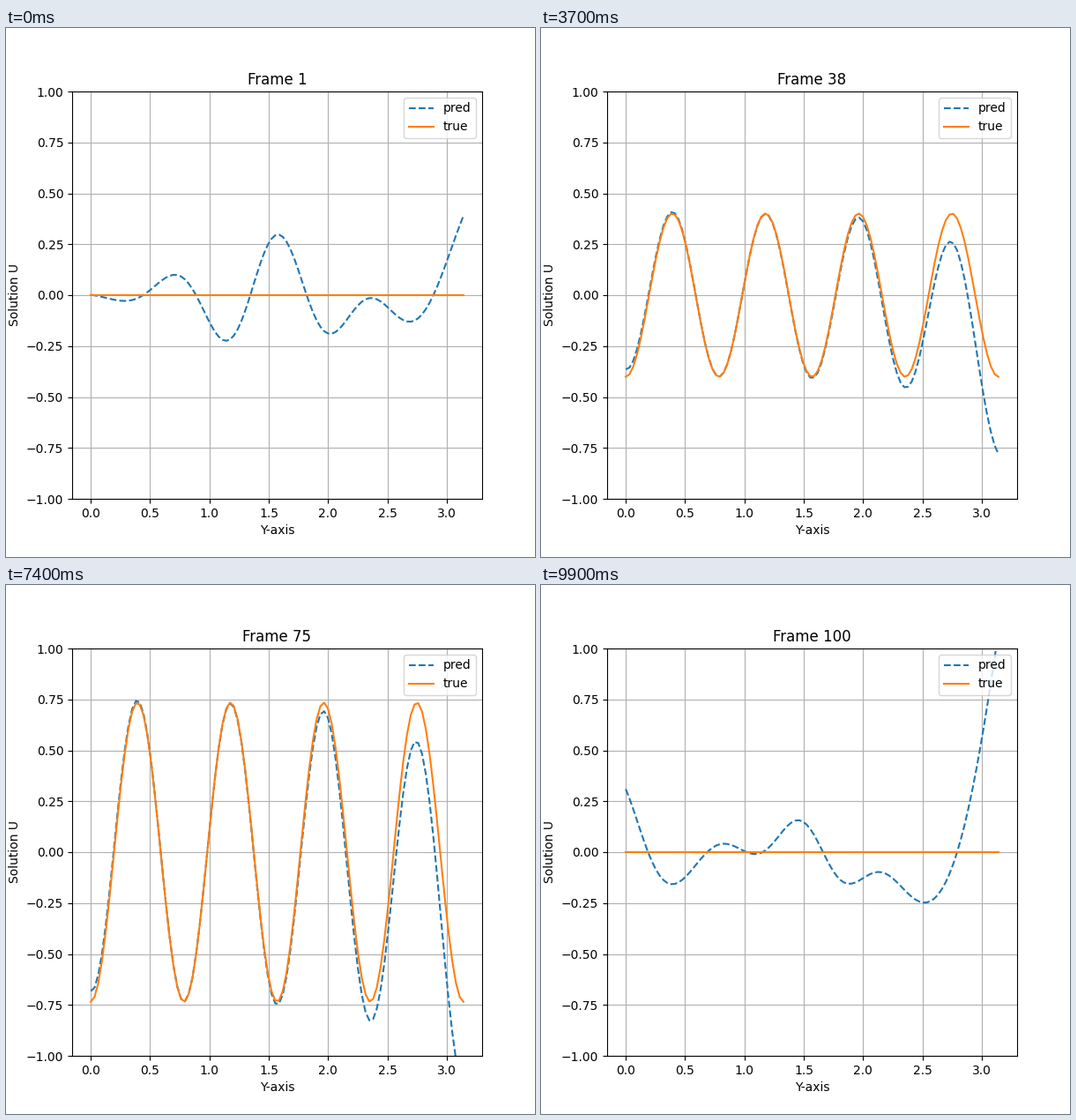
These frames come from a looping animation (600 px wide and 600 px high, 10 s). A matplotlib script:

```python
import numpy as np
import matplotlib.pyplot as plt
from matplotlib.animation import FuncAnimation

N = 100
x = np.linspace(0, np.pi, N)[:, None]
y = np.linspace(0, np.pi, N)
s = np.pi - y  # distance from the far edge


def bell(t, center, width):
    return np.exp(-((t - center) / width) ** 2)


def ripple(t, size, freq, phase, decay):
    """Damped wave running in from an edge."""
    return size * np.cos(freq * t + phase) * np.exp(-decay * t)


def packet(size, peak, center, width):
    return size * np.cos(7 * (y - peak)) * bell(y, center, width)


# Prediction error at the first and last step, and in between
start = packet(0.27, 1.57, 1.57, 0.9) + ripple(s, 0.427, 4.1, 0.42, 1.64)
end = (packet(0.17, 1.42, 1.65, 0.6) + ripple(y, 0.334, 6.28, 0.38, 1.84)
       + ripple(s, 1.2, 3.2, 0.45, 2.1))
inner = ((0.36 * np.sin(5 * x - 0.8) - 0.04) * np.exp(-2.6 * s)
         - 0.2 * np.cos(x) ** 4 * bell(s, 0.5, 0.8)
         - 0.1 * np.sin(x) * np.sin(5 * x) * np.exp(-4 * y))

first, last = bell(x, 0, 0.15), bell(x, np.pi, 0.15)
error = first * start + last * end + (1 - first - last) * inner

exact = np.sin(5 * x) * np.cos(8 * y)
predicted = exact + error

fig, ax = plt.subplots(figsize=(6, 6), dpi=100)
pred_line, = ax.plot(y, predicted[0], "--", label="pred")
true_line, = ax.plot(y, exact[0], label="true")
ax.set_ylim(-1, 1)
ax.set_xlabel("Y-axis")
ax.set_ylabel("Solution U")
ax.legend(loc="upper right")
ax.grid(True)
title = ax.set_title("Frame 1")


def update(i):
    pred_line.set_ydata(predicted[i])
    true_line.set_ydata(exact[i])
    title.set_text(f"Frame {i + 1}")
    return pred_line, true_line, title


anim = FuncAnimation(fig, update, frames=N, interval=100, repeat=True, repeat_delay=0)
plt.show()
```
